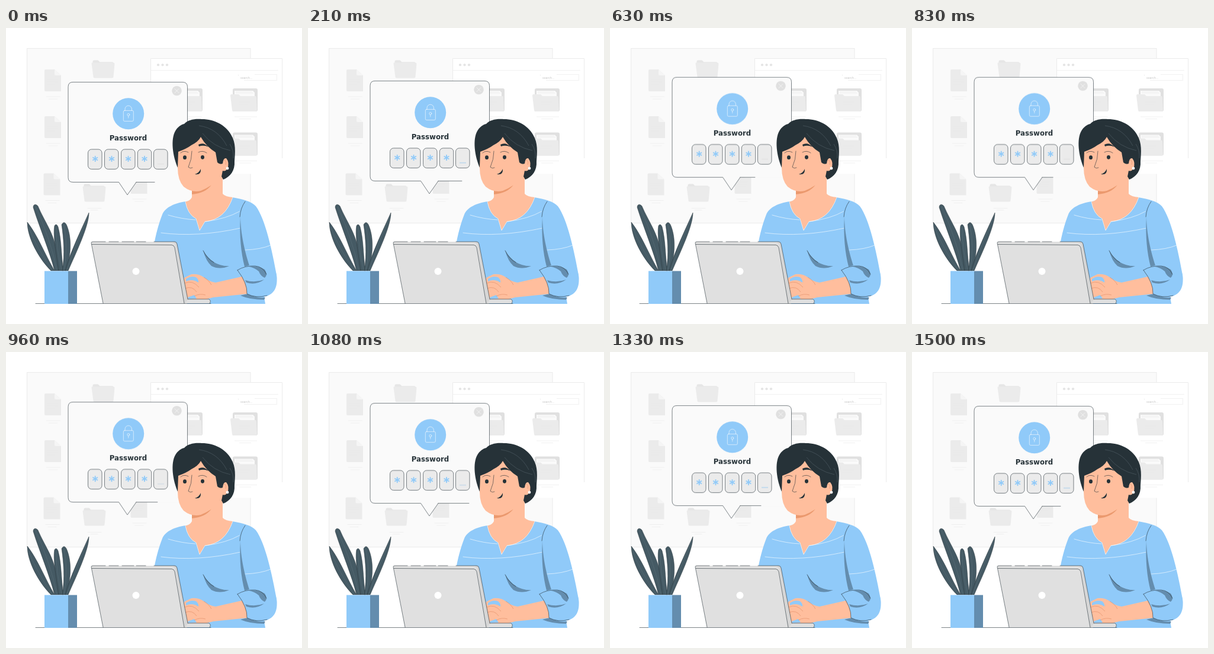
Animation, 500 px wide and 500 px high, one loop 1.54 s. Source, as an HTML page:

```html
<!DOCTYPE html>
<html lang="en">
<head>
<meta charset="utf-8">
<title>Password</title>
<style>
  html, body { margin: 0; width: 100%; height: 100%; overflow: hidden; background: #fff; }
  svg { display: block; width: 100vw; height: 100vh; }
  .line { fill: none; stroke: #263238; stroke-width: .6; stroke-linecap: round; stroke-linejoin: round; }
  .thin { fill: none; stroke: #e8e8e8; stroke-width: .6; }
  .white { fill: none; stroke: #fff; stroke-width: .6; stroke-linecap: round; }
  .crease { fill: none; stroke: #df8b65; stroke-width: .6; }
  .skin { fill: #ffbe9d; }
  .dark { fill: #263238; }
  .blue { fill: #90caf9; }
  .shade { fill: #648dae; }
  .key { fill: #ebebeb; stroke: #263238; stroke-width: .6; }
  .star { stroke: #90caf9; stroke-width: 1.8; }
  .leaf { fill: #455a64; stroke: #263238; stroke-width: .5; }
  .vein { fill: none; stroke: #5f727c; stroke-width: .5; }
  .title { font: bold 11.8px "DejaVu Sans", sans-serif; fill: #263238; text-anchor: middle; }
  .hint { font: 5px Inter, sans-serif; fill: #c4c4c4; }

  .bubble { animation: bob 1540ms cubic-bezier(.37, 0, .63, 1) -40ms infinite; }
  .caret { stroke: #90caf9; stroke-width: .8; animation: blink 1540ms linear infinite; }
  .edge { stroke-dasharray: 60; animation: edge 1540ms linear infinite; }
  @keyframes bob {
    0%, 100% { transform: translateY(-.5px); }
    50% { transform: translateY(-9.2px); }
  }
  @keyframes blink {
    0%, 41%, 54% { opacity: 0; }
    15%, 27%, 86%, 97% { opacity: 1; }
    70% { opacity: .6; }
    100% { opacity: 0; }
  }
  @keyframes edge {
    0%, 97.4%, 100% { stroke-dashoffset: 29px; }
    24.7% { stroke-dashoffset: 13px; }
    40.9% { stroke-dashoffset: 35px; }
    53.9% { stroke-dashoffset: 42px; }
    70.1% { stroke-dashoffset: 8px; }
    86.4% { stroke-dashoffset: 25px; }
  }
</style>
</head>
<body>
<svg viewBox="0 0 500 500">
  <defs>
    <g id="doc">
      <path fill="#ebebeb" d="M2 0H17L28 10V37H2Q0 37 0 35V2Q0 0 2 0Z"/>
      <path fill="#f5f5f5" d="M17 0V8Q17 10 19 10H28Z"/>
      <path class="thin" d="M5 17H22M5 21H22M5 25H18M3 46H27M7 50H22"/>
    </g>
    <g id="folder">
      <path fill="#e6e6e6" d="M2 2Q2 0 4 0H11L14 3H35Q37 3 37 5V10H2Z"/>
      <path fill="#ebebeb" d="M0 5Q0 4 1 4H37Q39 4 39 6L37 28Q37 30 35 30H5Q3 30 3 28Z"/>
      <path class="thin" d="M8 41H32M13 44H26"/>
    </g>
    <g id="files">
      <path fill="#e0e0e0" d="M4 3Q4 0 7 0H43Q46 0 46 3V36Q46 39 43 39H4Z"/>
      <path fill="#fafafa" d="M7 4H38L41 7V14H7Z"/>
      <path class="thin" d="M9 6H37M9 8H39"/>
      <path fill="#ebebeb" d="M0 12Q0 10 2 10H14L17 13H42Q44 13 44 15L45 37Q45 39 43 39H5Q3 39 3 37Z"/>
      <path class="thin" d="M14 23H34M14 27H29M7 48H45M15 51.500H35"/>
    </g>
    <path id="star" class="star" d="M0-5V5M-4.400-2.500L4.400 2.500M4.400-2.500L-4.400 2.500"/>
    <rect id="key" class="key" width="23.500" height="33.500" rx="6"/>
  </defs>

  <!-- Windows -->
  <rect x="35.500" y="34.500" width="377.500" height="295" fill="#fafafa" stroke="#ebebeb"/>
  <use href="#doc" x="65" y="70"/>
  <use href="#doc" x="65" y="149"/>
  <use href="#doc" x="63.500" y="245.500"/>
  <use href="#doc" x="210.500" y="243"/>
  <use href="#folder" x="144.500" y="54.500"/>
  <use href="#folder" x="129.500" y="263.500"/>

  <rect x="244" y="51" width="223" height="195.500" fill="#fff"/>
  <path fill="none" stroke="#ebebeb" d="M244.500 92V51.500H466.500V220"/>
  <path class="thin" d="M245 71.500H460M392.500 81V78.500M420 78.500H457.500V88.500H402"/>
  <g fill="#e4e4e4"><circle cx="257" cy="62.300" r="2.100"/><circle cx="264.500" cy="62.300" r="2.100"/><circle cx="272" cy="62.300" r="2.100"/></g>
  <text class="hint" x="396" y="85.500">search...</text>
  <use href="#files" x="379" y="102"/>
  <use href="#files" x="379" y="176.500"/>
  <use href="#files" x="286" y="102"/>

  <!-- Speech bubble -->
  <g class="bubble">
    <path fill="#fafafa" d="M113 92H298Q306.500 92 306.500 100V253Q306.500 261 298 261H220L205 282.500L190.500 261H113Q105 261 105 253V100Q105 92 113 92Z"/>
    <path class="line" d="M306.500 200V100Q306.500 92 298 92H113Q105 92 105 100V253Q105 261 113 261H190.500L205 282.500L220 261"/>
    <path class="line edge" d="M220 261H280"/>
    <circle cx="288.500" cy="106.700" r="8.200" fill="#e0e0e0"/>
    <path class="white" d="M285 103.200L292 110.200M292 103.200L285 110.200"/>
    <circle class="blue" cx="206.700" cy="145.300" r="26.500"/>
    <g class="white">
      <rect x="198.300" y="140" width="17" height="18" rx="2"/>
      <path d="M201 140V137.500A5.700 5.700 0 0 1 212.400 137.500V140"/>
      <circle cx="206.800" cy="147" r="2"/>
      <path d="M206.800 149V152.500"/>
    </g>
    <text class="title" x="206.500" y="190.300">Password</text>
    <use href="#key" x="138.500" y="205.500"/>
    <use href="#key" x="166.500" y="205.500"/>
    <use href="#key" x="194.500" y="205.500"/>
    <use href="#key" x="222.300" y="205.500"/>
    <use href="#key" x="249.500" y="205.500"/>
    <use href="#star" x="150.700" y="221.500"/>
    <use href="#star" x="178.500" y="221.500"/>
    <use href="#star" x="206.500" y="221.500"/>
    <use href="#star" x="234" y="221.500"/>
    <path stroke="#d8d8d8" stroke-width=".6" d="M256 230.300H267"/>
    <path class="caret" d="M256 230.300H267"/>
  </g>

  <!-- Body -->
  <path class="blue" d="M304 293C284 296 269 303 264 315C257 333 253 350 250 366L290 400L306 466H438L436 454C452 451 460 439 457 417C450 378 438 322 422 301C415 293 400 289 382 286Z"/>
  <path class="skin" d="M314 268V286Q311 292 303 293.500Q307 315 321 322L327 342L336 327Q370 324 383 286Q370 285 366 280V244Z"/>
  <path fill="#eb996e" d="M314 274Q333 272 347 265Q337 279 314 281Z"/>
  <path class="white" d="M303 293.500Q307 315 321 322L327 342L336 327Q370 324 383 286M274 316Q298 323 320 324M337 327Q373 322 394 310M262 346Q323 354 396 338M404 375Q430 374 447 367"/>
  <path class="shade" d="M333 376Q349 403 377 402Q361 409 347 402Q338 394 333 376Z"/>
  <path class="shade" d="M396 319C396 347 404 380 411 401L403 403C397 380 394 350 396 319Z"/>
  <path class="line" d="M404 293Q396 304 395 319M333 376Q340 390 351 396"/>
  <path class="shade" d="M396 452L408 449Q424 457 438 455L436 459Q412 459 396 452Z"/>

  <!-- Head -->
  <path class="dark" d="M291 238C281 216 278 188 286 174C290 167 296 163 301 162C307 155 319 153 331 154C352 154 371 164 380 180C389 194 387 211 386 225C387 241 379 251 367 256L363 249L350 225Z"/>
  <path class="skin" d="M290 236L291 209Q305 204 313 198Q325 192 329 184Q338 200 354 210L357 227Q361 231 366 229Q367 219 372 220Q378 227 374 238Q370 243 366 241L364 251Q347 268 329 275Q314 279 300 268Q290 257 290 236Z"/>
  <path fill="none" stroke="#5b6970" stroke-width=".5" d="M326 165Q357 169 373 199M332 178Q350 201 379 207M378 196Q385 206 384 220"/>
  <path class="line" d="M314 208Q314 222 308 235Q311 238 315 236M295 211Q300 206 308 210M325 210Q332 206 339 211"/>
  <path class="crease" d="M368 223Q373 224 371 231"/>
  <path class="dark" d="M325 197Q334 192 342 201Q334 197 326 200ZM319 247Q326 245 329 238Q330 249 319 247Z"/>
  <ellipse class="dark" cx="302" cy="218.700" rx="3" ry="3.400"/>
  <ellipse class="dark" cx="332" cy="218.300" rx="3" ry="3.400"/>
  <circle cx="374" cy="237" r="2.400" fill="#fff"/>

  <!-- Arm -->
  <path class="skin" d="M407 418L354 430Q344 429 334 421Q326 415 313 416L301 422L299 438L306 459H335L350 455L409 449Z"/>
  <path class="blue" d="M304 424Q312 418 321 421Q326 425 325 430Q315 423 304 428ZM307 455L318 451L322 457L308 458Z"/>
  <path class="crease" d="M302 431Q315 425 326 438M302 440Q315 435 322 446M334 421Q343 426 347 434M318 453Q327 448 337 451"/>
  <path class="blue" d="M391 409Q402 401 420 402Q439 394 451 398L457 417Q459 440 441 452Q422 457 407 449Q408 431 391 409Z"/>
  <path class="shade" d="M410 403Q425 401 437 408Q443 417 437 422Q430 419 427 411Q420 405 410 403ZM404 426Q420 431 436 425Q422 435 406 430Z"/>
  <path class="line" d="M391 409Q408 431 407 449Q422 457 441 452M391 409Q404 401 421 402Q434 403 440 416"/>

  <!-- Laptop -->
  <path class="line" d="M50 465.500H346"/>
  <path fill="#e0e0e0" d="M302 458H343Q347 461 344 465H290Z"/>
  <path class="line" d="M306 458H343Q347 461 344 465"/>
  <path fill="#d6d6d6" d="M146 361H285Q288 361 289 365L307 458L303 465H280Z"/>
  <path fill="#e0e0e0" d="M144 362Q144 361 147 361H282L286 366L301 465H164Z"/>
  <path class="line" d="M164 465L144 363Q144 361 147 361H168M174 361H190M196 361H216M220 361H236M250 361H285Q288 361 289 365L307 458M145 365.500L280 366.500Q284 367 285 371L301 465"/>
  <circle cx="219.500" cy="411" r="6" fill="#fff"/>

  <!-- Plant -->
  <g class="leaf">
    <path d="M36 328C36 353 54 388 76 410H82C66 383 53 349 36 328Z"/>
    <path d="M82 410C74 378 56 335 46 303C46 297 51 297 54 301C65 327 80 345 85 375Q88 391 89 410Z"/>
    <path d="M89 410C85 382 79 350 82 334Q85 329 88 336C94 358 93 384 97 410Z"/>
    <path d="M95 410C100 381 97 354 94 332Q98 325 102 332C112 354 110 387 101 410Z"/>
    <path d="M100 410C109 377 128 339 140 312C140 335 119 378 105 410Z"/>
  </g>
  <path class="vein" d="M38 336Q52 372 78 409M50 302Q75 356 86 409M85 337Q85 374 94 409M98 333Q106 369 98 409M138 319Q116 369 103 409"/>
  <path class="blue" d="M65 410.500H105V466H65Z"/>
  <path class="shade" d="M105 410.500H120V466H105Z"/>
</svg>
</body>
</html>
```
